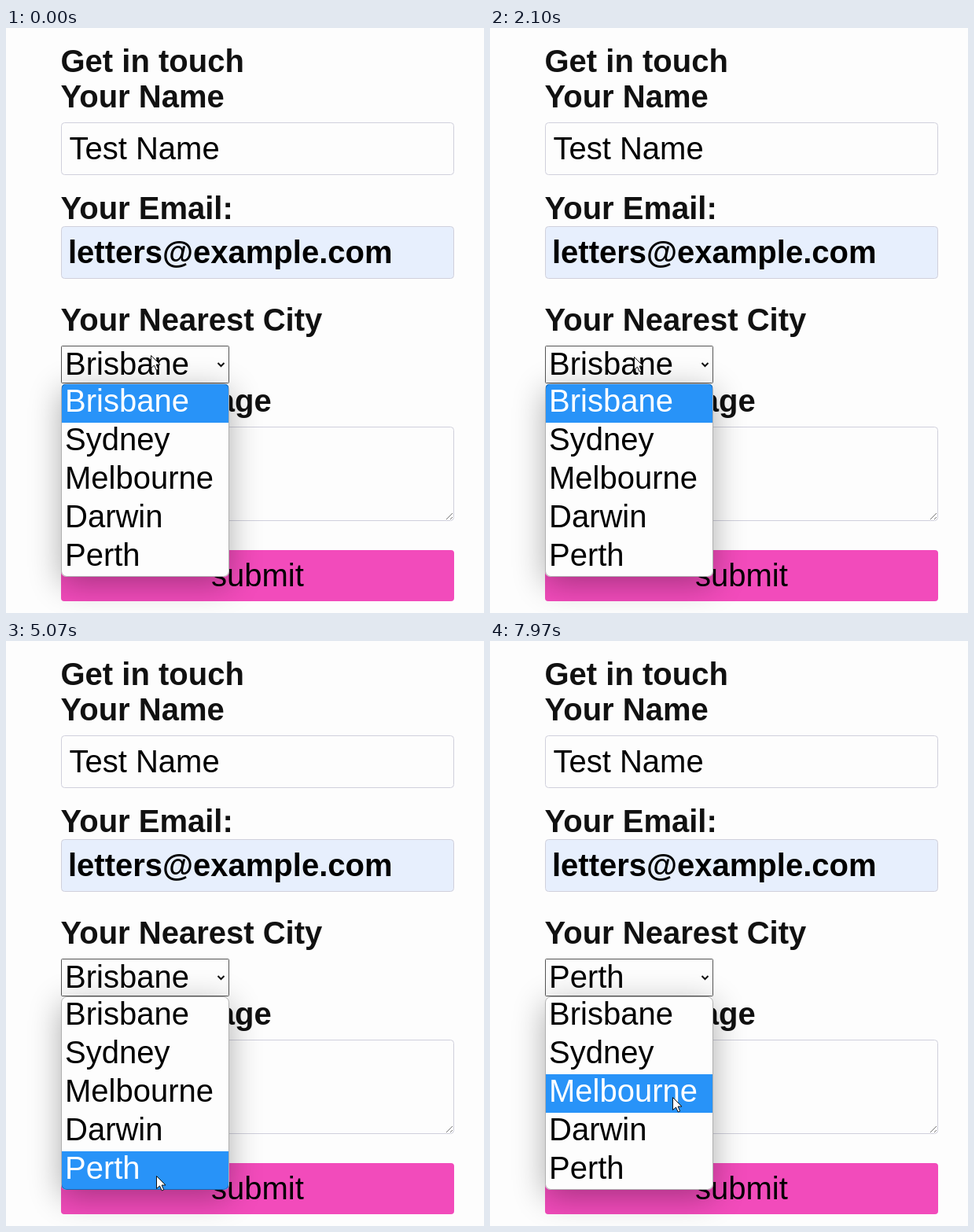
Animation of 608x744 px, one loop 8 s. Source, as an HTML page with a canvas:

```html
<!DOCTYPE html>
<html lang="en">
<head>
<meta charset="utf-8">
<title>Contact form</title>
<style>
  html, body { margin: 0; width: 100%; height: 100%; overflow: hidden; background: #fdfdfd; }
  canvas { display: block; }
</style>
</head>
<body>
<canvas id="stage" width="608" height="744"></canvas>
<script>
const ctx = document.getElementById('stage').getContext('2d');
const LOOP = 8000;
const PAPER = '#fdfdfd', INK = '#111', LINE = '#d0d0dc', PINK = '#f24bbb', BLUE = '#2893f8';
const FONT = '40px "Liberation Sans", Arial, sans-serif';
const CITIES = ['Brisbane', 'Sydney', 'Melbourne', 'Darwin', 'Perth'];
const LIST = { x: 70, y: 452, w: 214, h: 246, row: 49 };
const CLOSE_AT = 6060, OPEN_AT = 7230;

// Pointer path: time, x, y
const PATH = [
  [0, 184, 416], [600, 183, 417], [2420, 183, 418],
  [4130, 196, 594], [5000, 191, 680], [6120, 191, 681],
  [6800, 232, 446], [7350, 232, 446], [8000, 232, 586]
];

function pointerAt(t) {
  const i = PATH.findIndex(p => p[0] > t);
  const [t0, x0, y0] = PATH[i - 1], [t1, x1, y1] = PATH[i];
  const u = (t - t0) / (t1 - t0);
  return { x: Math.round(x0 + (x1 - x0) * u), y: Math.round(y0 + (y1 - y0) * u) };
}

function text(str, x, y, color = '#000', bold = false) {
  ctx.font = (bold ? 'bold ' : '') + FONT;
  ctx.fillStyle = color;
  ctx.fillText(str, x, y);
}

function roundRect(x, y, w, h, r) {
  ctx.beginPath();
  ctx.roundRect(x, y, w, h, r);
}

function box(x, y, w, h, { fill = PAPER, line = LINE, width = 1, r = 4 } = {}) {
  const d = width / 2;
  roundRect(x + d, y + d, w - width, h - width, r);
  ctx.fillStyle = fill;
  ctx.fill();
  ctx.strokeStyle = line;
  ctx.lineWidth = width;
  ctx.stroke();
}

function stroke(points, color, width) {
  ctx.beginPath();
  points.forEach(([x, y]) => ctx.lineTo(x, y));
  ctx.strokeStyle = color;
  ctx.lineWidth = width;
  ctx.stroke();
}

function drawForm() {
  ctx.fillStyle = PAPER;
  ctx.fillRect(0, 0, 608, 744);
  const labels = [['Get in touch', 56], ['Your Name', 101], ['Your Email:', 243],
    ['Your Nearest City', 385], ['Your Message', 488]];
  labels.forEach(([str, y]) => text(str, 69.5, y, INK, true));

  box(70, 120, 500, 67);
  text('Test Name', 80.5, 167);
  box(70, 252, 500, 67, { fill: '#e7effd' });
  text('letters@example.com', 79, 299, '#000', true);

  box(70, 507, 500, 120);
  stroke([[560, 625], [568, 617]], '#777', 1);
  stroke([[565, 625], [568, 622]], '#777', 1);

  roundRect(70, 664, 500, 65, 4);
  ctx.fillStyle = PINK;
  ctx.fill();
  text('submit', 261, 710);
}

function drawSelect(value, open) {
  box(70, 404, 214, 48, open
    ? { line: '#555', r: 1 }
    : { line: '#101010', width: 2, r: 3 });
  text(CITIES[value], 75, 441);
  stroke([[269.5, 426], [273.5, 430], [277.5, 426]], '#111', 2);
}

function drawList(active) {
  const { x, y, w, h, row } = LIST;
  ctx.save();
  roundRect(x, y, w, h, 7);
  ctx.fillStyle = PAPER;
  ctx.shadowColor = 'rgba(0,0,0,.32)';
  ctx.shadowBlur = 40;
  ctx.shadowOffsetY = 9;
  ctx.fill();
  ctx.shadowColor = 'transparent';
  ctx.clip();
  ctx.fillStyle = BLUE;
  ctx.fillRect(x + 1, y + 1 + active * row, w - 2, row);
  ctx.restore();

  roundRect(x + .5, y + .5, w - 1, h - 1, 7);
  ctx.strokeStyle = 'rgba(0,0,0,.3)';
  ctx.lineWidth = 1;
  ctx.stroke();
  CITIES.forEach((city, i) => text(city, 75, 488 + i * row, i === active ? '#fff' : '#000'));
}

function drawPointer({ x, y }) {
  const shape = [[0, 0], [0, 16], [4, 12.5], [6.7, 18.5], [9.2, 17.4], [6.6, 11.5], [11.5, 11.5]];
  ctx.beginPath();
  shape.forEach(([dx, dy]) => ctx.lineTo(x + .5 + dx, y + .5 + dy));
  ctx.closePath();
  ctx.fillStyle = '#fff';
  ctx.fill();
  ctx.strokeStyle = '#111';
  ctx.lineWidth = 1;
  ctx.stroke();
}

function draw(t) {
  const open = t < CLOSE_AT || t >= OPEN_AT;
  const value = t < CLOSE_AT ? 0 : 4;
  const pointer = pointerAt(t);
  const hovered = Math.floor((pointer.y - LIST.y - 1) / LIST.row);
  drawForm();
  drawSelect(value, open);
  if (open) drawList(hovered < 0 ? value : Math.min(hovered, 4));
  drawPointer(pointer);
}

const start = performance.now();
function tick() {
  draw((performance.now() - start) % LOOP);
  requestAnimationFrame(tick);
}
tick();
</script>
</body>
</html>
```
